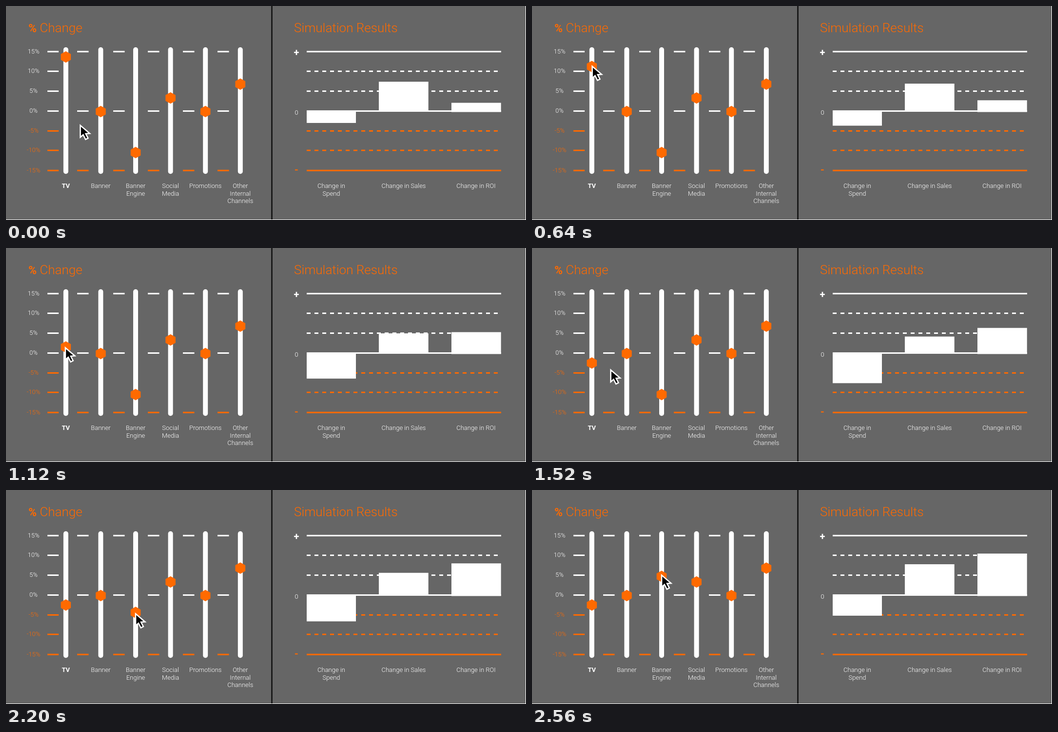
An HTML page that plays this animation: 1067 px wide and 441 px high, repeating every 3040 ms.

```html
<!DOCTYPE html>
<html lang="en">
<head>
<meta charset="utf-8">
<title>Simulation sliders</title>
<style>
html, body { margin: 0; width: 100%; height: 100%; overflow: hidden; background: #fff; }
svg { display: block; }
text { font: 300 13px Roboto, sans-serif; fill: #fff; }
.mid { text-anchor: middle; }
.title { font-size: 26px; }
.bold { font-weight: 700; }
.orange { fill: #ff6a00; }
</style>
</head>
<body>
<svg id="stage" width="1067" height="441" viewBox="0 0 1067 441">
  <rect width="1066" height="440" fill="#666"/>
  <rect x="544" width="3" height="440" fill="#1a1a1a"/>
  <text class="title orange" x="46" y="54"><tspan class="bold" font-size="23">%</tspan> Change</text>
  <text class="title orange" x="591" y="54">Simulation Results</text>
  <text class="mid bold" x="596" y="102" style="font-size:20px">+</text>
  <text class="mid" x="596" y="223.5">0</text>
  <text class="mid bold orange" x="596" y="344" style="font-size:20px">-</text>
</svg>
<script>
const ORANGE = '#ff6a00', WHITE = '#fff';
const stage = document.getElementById('stage');

function add(tag, attrs, text = '') {
  const el = document.createElementNS('http://www.w3.org/2000/svg', tag);
  set(el, attrs);
  el.textContent = text;
  stage.append(el);
  return el;
}
function set(el, attrs) {
  for (const key in attrs) el.setAttribute(key, attrs[key]);
}
function line(x1, x2, y, stroke, dash = 'none') {
  add('path', { d: `M${x1} ${y}H${x2}`, stroke, 'stroke-width': 3, 'stroke-dasharray': dash });
}
function label(x, y, lines, cls = '') {
  lines.split('|').forEach((s, i) => add('text', { x, y: y + i * 15.5, class: 'mid ' + cls }, s));
}

// Scales and grid lines
[94, 134.5, 175.5, 216.5, 257.5, 297.5, 339].forEach((y, i) => {
  const color = i > 3 ? ORANGE : WHITE;
  label(56.5, y + 3.5, 15 - i * 5 + '%', i > 3 ? 'orange' : '');
  line(85, 108, y, color);
  if (i % 3 == 0) for (const x of [146, 220, 291, 363, 434]) line(x, x + 23.5, y, color);
  line(617, 1016, y, color, i % 3 ? '8 8' : 'none');
});

// Sliders
const knobs = [['TV', 105], ['Banner', 217.5], ['Banner|Engine', 302], ['Social|Media', 189.5],
  ['Promotions', 217.5], ['Other|Internal|Channels', 161]].map(([name, y], i) => {
  const x = 122.8 + i * 71.6;
  add('path', { d: `M${x} 90V341`, stroke: WHITE, 'stroke-width': 10, 'stroke-linecap': 'round' });
  label(x, 375, name, i ? '' : 'bold');
  const el = add('path', { d: 'M0-11.8 10.3-6V6L0 11.8-10.3 6V-6Z', fill: ORANGE });
  const move = y => set(el, { transform: `translate(${x} ${y})` });
  move(y);
  return move;
});

label(667.5, 375, 'Change in|Spend');
label(816, 375, 'Change in Sales');
label(964.5, 375, 'Change in ROI');
const bars = [617, 765, 914].map(x => add('rect', { x, width: x == 617 ? 101 : 101.7, fill: WHITE }));

const cursor = add('path', {
  d: 'M1.5 2V26.5L7.3 21.4 12.3 31 17.3 28.4 12.6 19.2 20.8 18.6Z',
  stroke: WHITE, 'stroke-width': 2.6
});

const LOOP = 3040;
const phase = (t, a, b) => Math.min(1, Math.max(0, (t - a) / (b - a)));
const mix = (a, b, k) => a + (b - a) * k;
const bezier = (p, k) => {
  const j = 1 - k;
  return j * j * j * p[0] + 3 * j * j * k * p[1] + 3 * j * k * k * p[2] + k * k * k * p[3];
};

// Cursor path: start, end, x controls, y controls
const moves = [
  [0, 520, [151, 143, 135, 124], [244, 197, 149, 102]],
  [520, 1320, [124, 119, 119, 122], [102, 147, 192, 238]],
  [1360, 2000, [122, 172, 227, 264.5], [238, 246, 288, 297]],
  [2000, 2560, [264.5, 264.5, 264.5, 264.5], [297, 256, 215, 173.5]]
];

function draw(t) {
  const down = phase(t, 520, 1320), up = phase(t, 1960, 2560);
  const stages = (a, b, c) => mix(mix(a, b, down), c, up);
  knobs[0](mix(105, 237, down));
  knobs[2](mix(302, 178, up));

  const spend = stages(241, 278.5, 259), sales = stages(156, 182.5, 153), roi = stages(199.5, 164.7, 131);
  set(bars[0], { y: 215, height: spend - 215 });
  set(bars[1], { y: sales, height: 218 - sales });
  set(bars[2], { y: roi, height: 218.5 - roi });

  const [a, b, xs, ys] = moves.findLast(m => t >= m[0]);
  const k = phase(t, a, b);
  set(cursor, { transform: `translate(${bezier(xs, k)} ${bezier(ys, k)})` });
}

function tick(now) {
  // The picture advances 25 times a second
  draw(Math.floor(now % LOOP / 40) * 40);
  requestAnimationFrame(tick);
}
draw(0);
requestAnimationFrame(tick);
</script>
</body>
</html>
```
